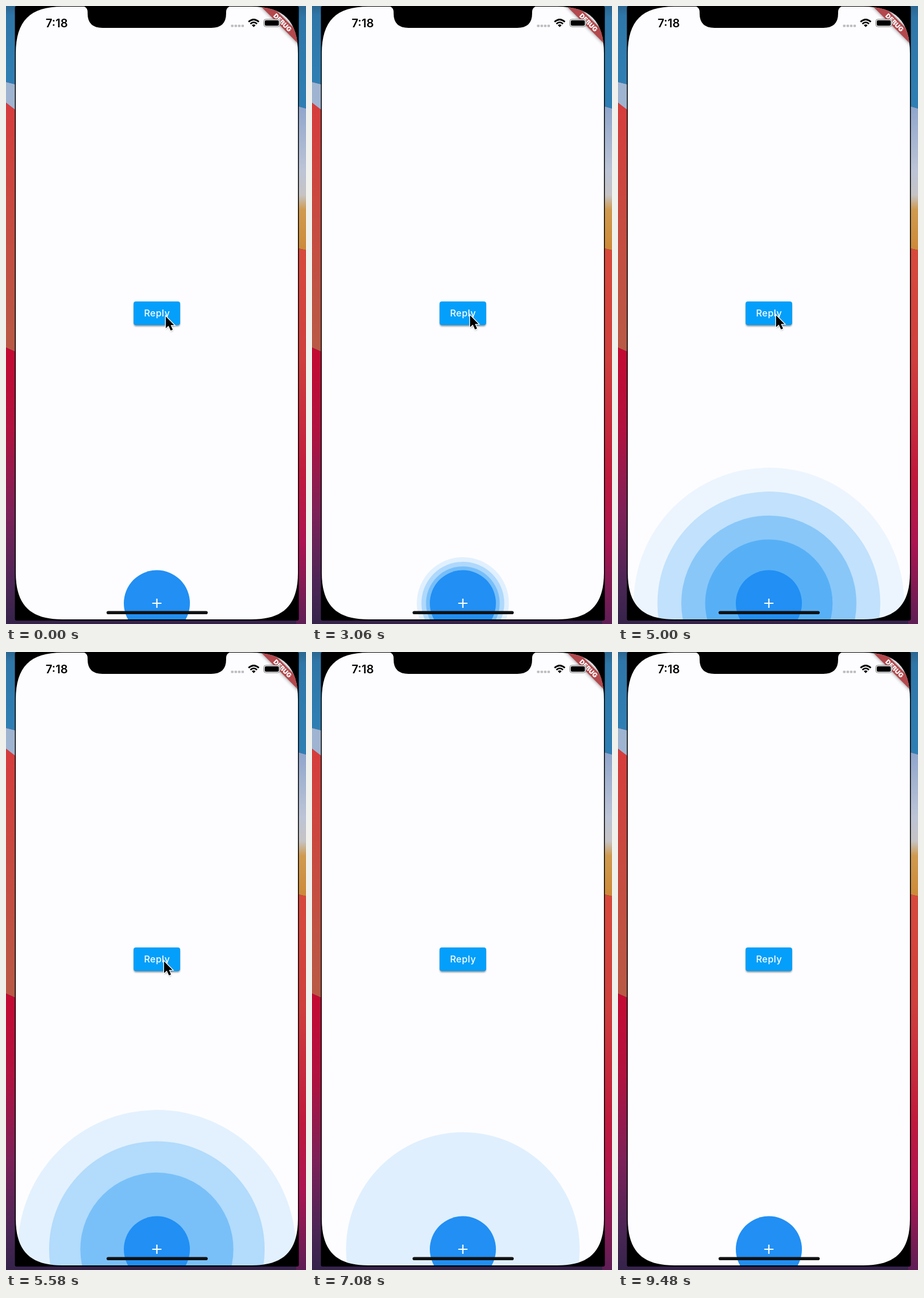
Write an HTML page that moves like this. It is 522x1073 px and loops after 9.5 s.

```html
<!DOCTYPE html>
<html lang="en">
<head>
<meta charset="utf-8">
<title>Ripple button</title>
<style>
  html, body { margin: 0; width: 100%; height: 100%; overflow: hidden; background: #000; }
  svg { display: block; width: 522px; height: 1073px; }
  text { font-family: Inter, Roboto, sans-serif; }
</style>
</head>
<body>
<svg viewBox="0 0 522 1073">
  <defs>
    <linearGradient id="blue" x2="0" y2="1">
      <stop offset="0" stop-color="#2b668f"/><stop offset=".12" stop-color="#2f76a8"/><stop offset="1" stop-color="#2f7fb4"/>
    </linearGradient>
    <linearGradient id="rust" x2="0" y2="1">
      <stop offset="0" stop-color="#d63c3c"/><stop offset=".45" stop-color="#c74a40"/><stop offset="1" stop-color="#b85a45"/>
    </linearGradient>
    <linearGradient id="plum" x2="0" y2="1">
      <stop offset="0" stop-color="#c40a32"/><stop offset=".3" stop-color="#b0123f"/>
      <stop offset=".6" stop-color="#7c2158"/><stop offset=".85" stop-color="#4c2656"/><stop offset="1" stop-color="#35234a"/>
    </linearGradient>
    <linearGradient id="dawn" x2="0" y2="1">
      <stop offset="0" stop-color="#8fa5cc"/><stop offset=".45" stop-color="#bcc4d6"/><stop offset=".62" stop-color="#c6c3c4"/>
      <stop offset=".72" stop-color="#cf9a50"/><stop offset="1" stop-color="#cd8a38"/>
    </linearGradient>
    <linearGradient id="flame" x2="0" y2="1">
      <stop offset="0" stop-color="#d8493c"/><stop offset=".3" stop-color="#cf3f3d"/><stop offset=".6" stop-color="#c01a3c"/>
      <stop offset=".78" stop-color="#ad1450"/><stop offset="1" stop-color="#5e1f56"/>
    </linearGradient>
    <clipPath id="screen">
      <path d="M17 82C17 26 42 1 98 1H427C483 1 508 26 508 82V984C508 1040 483 1065 427 1065H98C42 1065 17 1040 17 984Z"/>
    </clipPath>
    <filter id="soft" x="-30%" y="-30%" width="160%" height="180%"><feGaussianBlur stdDeviation="1.6"/></filter>
    <filter id="blur" x="-30%" y="-80%" width="160%" height="260%"><feGaussianBlur stdDeviation="3"/></filter>
  </defs>

  <!-- wallpaper -->
  <rect width="522" height="1073" fill="#35234a"/>
  <path fill="url(#blue)" d="M0 0H20V137L0 132Z"/>
  <path fill="#9fb4d0" d="M0 132L20 137V184L0 168Z"/>
  <path fill="url(#rust)" d="M0 168L20 183V602L0 593Z"/>
  <path fill="url(#plum)" d="M0 593L20 602V1073H0Z"/>
  <path fill="url(#blue)" d="M505 0H522V178L505 173Z"/>
  <path fill="url(#dawn)" d="M505 173L522 178V424L505 420Z"/>
  <path fill="url(#flame)" d="M505 420L522 424V1073H505Z"/>

  <!-- phone -->
  <rect x="15.5" width="494" height="1067" rx="3"/>
  <g clip-path="url(#screen)">
    <rect x="16" width="494" height="1067" fill="#fdfdff"/>
    <g id="rings" fill="#2196f3"></g>
    <circle cx="262.5" cy="1037" r="57.5" fill="#218ff4"/>
    <path d="M254.5 1037h16M262.5 1029v16" stroke="#fff" stroke-width="2.2"/>

    <rect x="222.5" y="515" width="80" height="41" rx="4" fill="#000" opacity=".45" filter="url(#soft)"/>
    <rect x="222" y="513" width="81" height="41" rx="4" fill="#039ffa"/>
    <text x="262.8" y="539" text-anchor="middle" font-size="16" font-weight="500" letter-spacing=".5" fill="#fff">Reply</text>

    <g transform="translate(509 1) rotate(45)">
      <rect x="-66" y="32.2" width="132" height="13.8" opacity=".5" filter="url(#blur)"/>
      <rect x="-66" y="32.2" width="132" height="13.8" fill="#b3484d"/>
      <text y="43.3" text-anchor="middle" font-size="11.2" font-weight="900" fill="#fff">DEBUG</text>
    </g>
    <path d="M132 0Q142 1 142 11V13Q142 38 168 38H357Q383 38 383 13V11Q383 1 393 0Z"/>
    <rect x="175" y="1050.5" width="176" height="5.6" rx="2.8" fill="#111"/>
  </g>

  <!-- status bar -->
  <text x="69" y="36.5" font-size="20" font-weight="600">7:18</text>
  <g fill="#bcbcc0">
    <rect x="391.5" y="32.5" width="4.4" height="4" rx="1"/><rect x="397.6" y="32.5" width="4.4" height="4" rx="1"/>
    <rect x="403.6" y="32.5" width="4.4" height="4" rx="1"/><rect x="409.6" y="32.5" width="4.4" height="4" rx="1"/>
  </g>
  <g fill="none" stroke="#000" stroke-width="2.7">
    <path d="M422 27.6Q431 19.4 440 27.6M425.2 31Q431 25.8 436.8 31"/>
    <path d="M427.7 33.3Q431 30.6 434.3 33.3L431 36.8Z" fill="#000" stroke="none"/>
  </g>
  <rect x="448.5" y="23" width="28" height="13" rx="3.8" fill="#fff" stroke="#777" stroke-width="1"/>
  <rect x="450.2" y="24.7" width="24.6" height="9.6" rx="2.4"/>
  <path d="M478.3 27.4q2 2 0 4.2z" fill="#666"/>

  <g id="cursor">
    <path d="M0 2V23L5 18.3L8.8 26.6L12.8 24.8L9.2 16.8H15.4Z" opacity=".35" filter="url(#soft)"/>
    <path d="M0 0V20.6L4.8 16.3L8.6 24.6L12.2 23L8.6 15H14.6Z" stroke="#fff" stroke-width="2.6" paint-order="stroke"/>
  </g>
</svg>
<script>
  const LOOP = 9500, START = 1960, COUNT = 6;
  const box = document.getElementById('rings');
  const cursor = document.getElementById('cursor');

  // Each row: time, then values
  const growth = [ // radius of the innermost ring, gap between rings
    [1960, 15, 1], [3060, 40, 8], [4300, 80.7, 26.5], [5000, 110.8, 41.5],
    [6240, 158.5, 69], [7080, 203.2, 90], [7900, 249, 110]
  ];
  const path = [
    [0, 278, 539], [1300, 278, 539], [1700, 275, 537], [6000, 275, 537],
    [6240, 302, 477], [6640, 530, 107], [9500, 530, 107]
  ];

  function at(rows, t) {
    let k = 1;
    while (k < rows.length - 1 && rows[k][0] < t) k++;
    const a = rows[k - 1], b = rows[k];
    const u = Math.min(1, Math.max(0, (t - a[0]) / (b[0] - a[0])));
    return [a[1] + (b[1] - a[1]) * u, a[2] + (b[2] - a[2]) * u];
  }

  const rings = Array.from({ length: COUNT }, () => {
    const c = document.createElementNS('http://www.w3.org/2000/svg', 'circle');
    c.setAttribute('cx', 262.5);
    c.setAttribute('cy', 1037);
    return box.appendChild(c);
  });

  function draw(t) {
    const [inner, gap] = at(growth, t);
    rings.forEach((c, i) => {
      const left = (3800 + 815 * i - t) / 815;
      c.setAttribute('r', inner + (COUNT - 1 - i) * gap);
      c.setAttribute('opacity', t < START ? 0 : Math.min(1, Math.max(0, left * 0.138)));
    });
    const [x, y] = at(path, t);
    cursor.setAttribute('transform', `translate(${x} ${y})`);
    cursor.setAttribute('visibility', t < 6640 ? 'visible' : 'hidden');
  }

  const begin = performance.now();
  function tick() {
    draw((performance.now() - begin) % LOOP);
    requestAnimationFrame(tick);
  }
  tick();
</script>
</body>
</html>
```
